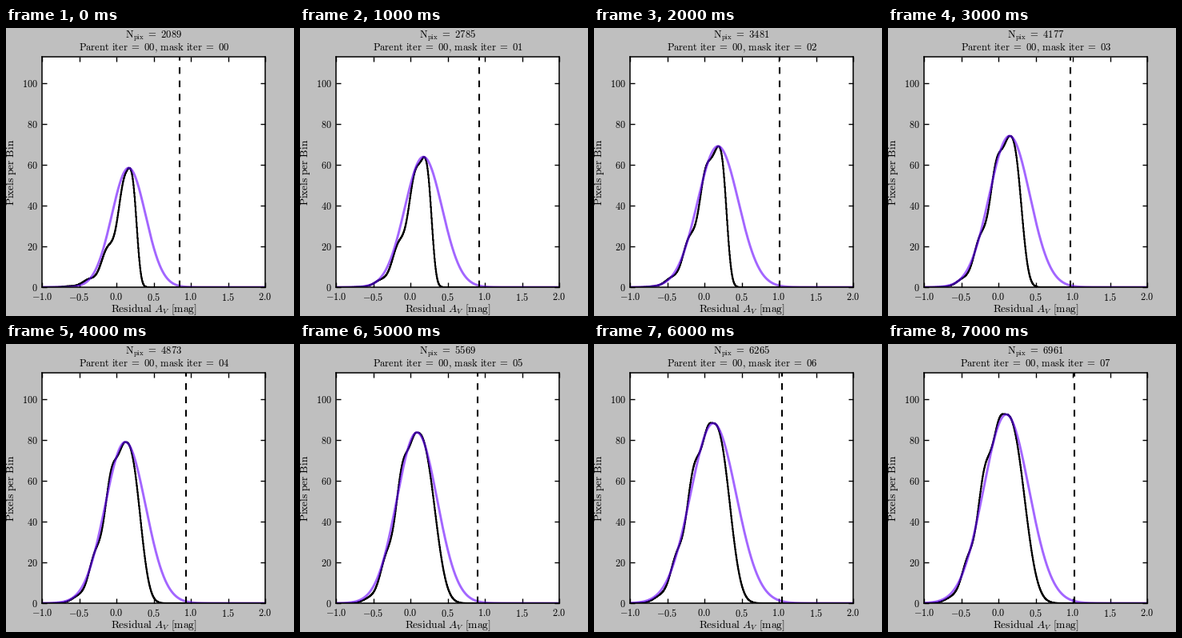
A matplotlib script that plays this animation: 360 by 360 pixels, repeating every 8 s.

```python
import numpy as np
import matplotlib.pyplot as plt
from matplotlib.animation import FuncAnimation

plt.rcParams["mathtext.fontset"] = "cm"

SIZE, DPI = 360, 100
VIOLET = "#6600ff"

# centre of the fit and the three-sigma cut at each mask iteration
CENTRES = [.165, .175, .183, .15, .12, .088, .12, .105]
CUTS = [.845, .93, 1.008, .97, .935, .903, 1.04, 1.02]

x = np.linspace(-1, 2, 601)


def flank(half, power):
    """Bell that falls to one half at the given distance."""
    return lambda dist: .5 ** ((dist / half) ** power)


def fit_curve(height, centre, cut):
    sigma = (cut - centre) / 3
    return height * np.exp(-.5 * ((x - centre) / sigma) ** 2)


def histogram(i, height, centre):
    dist = np.abs(x - centre)
    half_left = centre + .03 + .05 * i - .0022 * i ** 2
    half_right = .275 + .0135 * i - centre
    left = flank(half_left, 1.35 + .35 * np.sqrt(i))(dist)
    right = flank(half_right, 2.85 - .06 * i)(dist)
    # a ripple drifts down the left flank
    crest = .1 - .043 * i
    wave = np.cos(2 * np.pi * (x - crest) / .26)
    ripple = 10 * wave * left * np.sqrt(1 - left)
    return np.where(x < centre, height * left + ripple, height * right)


fig = plt.figure(figsize=(SIZE / DPI, SIZE / DPI), dpi=DPI, facecolor="#bfbfbf")
ax = fig.add_axes([.125, .1, .775, .8])
ax.set(xlim=(-1, 2), ylim=(0, 113))
xticks = np.arange(-1, 2.1, .5)
yticks = range(0, 101, 20)
ax.set_xticks(xticks, [f"${v:.1f}$" for v in xticks])
ax.set_yticks(yticks, [f"${v}$" for v in yticks])
ax.tick_params(direction="in", top=True, right=True, length=4, width=1,
               pad=4, labelsize=8.8)
for spine in ax.spines.values():
    spine.set_linewidth(1.1)


def label(px, py, text, size, **kw):
    return fig.text(px / SIZE, 1 - py / SIZE, text, size=size, ha="center",
                    va="baseline", rotation_mode="anchor", **kw)


label(185, 355, r"$\mathrm{Residual}\ A_V\ \mathrm{[mag]}$", 9.75)
label(10.5, 180.5, r"$\mathrm{Pixels\ per\ Bin}$", 9.6, rotation=90)
count = label(184.5, 13, "", 9.1)
iters = label(185, 28, "", 9.1)

data, = ax.plot([], [], "k", lw=1.5, drawstyle="steps-mid")
fit, = ax.plot([], [], color=VIOLET, alpha=.6, lw=2.1)
cut = ax.axvline(0, color="k", lw=1.5, dash_capstyle="butt")
cut.set_linestyle((0, (4, 4)))  # scaled by the line width


def draw(i):
    height = 58.5 + 5.5 * i - .09 * i ** 2
    centre, limit = CENTRES[i], CUTS[i]
    data.set_data(x, histogram(i, height, centre))
    fit.set_data(x, fit_curve(height, centre, limit))
    cut.set_xdata([limit, limit])
    count.set_text(rf"$\mathrm{{N_{{pix}}\ {{=}}\ {2089 + 696 * i}}}$")
    iters.set_text(r"$\mathrm{Parent\ iter\ {=}\ 00},\,"
                   rf"\mathrm{{mask\ iter\ {{=}}\ {i:02d}}}$")
    return data, fit, cut, count, iters


anim = FuncAnimation(fig, draw, frames=len(CENTRES), interval=1000,
                     repeat=True, repeat_delay=0)
plt.show()
```
